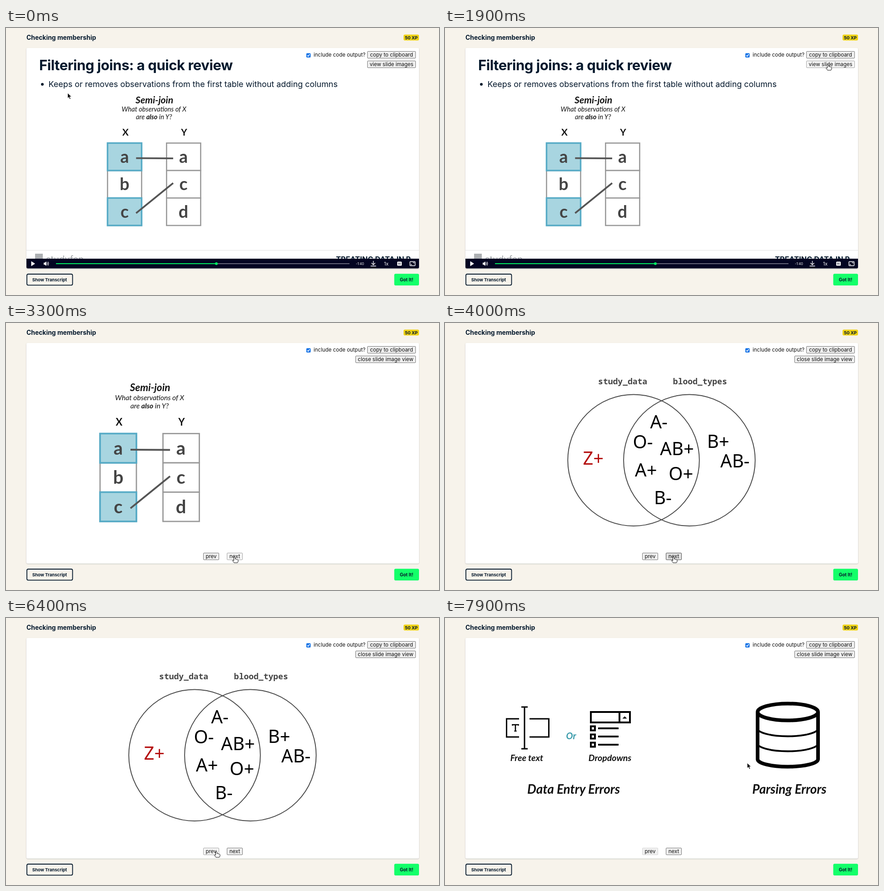
These frames come from a looping animation (953 px wide and 588 px high, 8000 ms). An HTML page:

```html
<!DOCTYPE html>
<html lang="en">
<head>
<meta charset="utf-8">
<title>Checking membership</title>
<style>
html, body { margin: 0; width: 100%; height: 100%; overflow: hidden; background: #f7f3eb; }
svg { display: block; width: 953px; height: 588px; font-family: Inter, "Open Sans", sans-serif; fill: #05192d; }
.b { font-weight: 700; }
.m { text-anchor: middle; }
.lato { font-family: Lato, sans-serif; fill: #111; text-anchor: middle; }
.i { font-style: italic; }
.line { fill: none; stroke: #000; }
.btn { font-size: 11.5px; text-anchor: middle; fill: #111; }
.btn rect { fill: #efefef; stroke: #767676; }
.btn.hover rect { fill: #dfdfdf; stroke: #4f4f4f; }
.btn.active rect { fill: #f5f5f5; stroke: #a5a5a5; }
.btn.off rect { fill: #f0f0f0; stroke: #d6d6d6; }
.venn { font: 41px "Noto Sans", sans-serif; text-anchor: middle; fill: #000; }
.venn .name { font: 700 18.5px "Noto Sans Mono", monospace; fill: #444; }
</style>
</head>
<body>
<svg viewBox="0 0 953 588">
  <defs>
    <filter id="shade" x="-5%" y="-5%" width="110%" height="110%">
      <feDropShadow dx="0" dy="1" stdDeviation="1.3" flood-color="#05192d" flood-opacity=".25"/>
    </filter>
  </defs>
  <text class="b" x="45" y="26" font-size="13.9">Checking membership</text>
  <rect x="875" y="14.500" width="34" height="13" rx="3" fill="#f0d316"/>
  <text class="b m" x="892" y="24.500" font-size="9.6">50 XP</text>
  <rect x="45" y="44" width="864" height="485.500" rx="3" fill="#fff" filter="url(#shade)"/>

  <g id="page">
    <text class="b" x="73" y="93" font-size="31" letter-spacing="-.45">Filtering joins: a quick review</text>
    <circle cx="80" cy="124" r="3"/>
    <text x="93.500" y="130" font-size="17.93">Keeps or removes observations from the first table without adding columns</text>
    <g id="small" transform="translate(29.3 25) scale(.938)"></g>
    <path d="M45 489.500H909" stroke="#e3e3e3"/>
    <rect x="64" y="497" width="17" height="17" fill="#adb0b3"/>
    <text x="88" y="516" font-size="20" fill="#a2a6aa">studyfen</text>
    <text class="b" x="891" y="515" font-size="16.3" text-anchor="end">TREATING DATA IN R</text>
    <path d="M45 508H909V526.500a3 3 0 0 1-3 3H48a3 3 0 0 1-3-3Z" fill="#030522"/>
    <path d="M110 519H756" stroke="#666779" stroke-width="2"/>
    <path d="M110 519H463" stroke="#03ef62" stroke-width="2"/>
    <circle cx="463" cy="519" r="3" fill="#03ef62"/>
    <g fill="#fff">
      <path d="M55.500 513.500L64 519L55.500 524.500Z"/>
      <path d="M83 516.800H85.500L88.800 514V524L85.500 521.200H83Z"/>
      <text class="m" x="779" y="522" font-size="7.4">-1:40</text>
      <text class="m" x="837" y="523" font-size="10.5">1x</text>
      <rect x="861" y="514.500" width="10" height="9" rx="1.500"/>
      <text class="b m" x="866" y="521" font-size="5.500" fill="#030522">cc</text>
    </g>
    <g fill="none" stroke="#fff" stroke-width="1.400">
      <path d="M90.300 516.500q2 2.500 0 5M92 514.600q3.500 4.400 0 8.800" stroke-width="1.100"/>
      <path d="M808.500 513V521M804.500 517.500L808.500 521.500L812.500 517.500M802.500 524.300H814.500"/>
      <rect x="889" y="514.500" width="11.500" height="9" rx="1"/>
      <path d="M891.500 519.500V521.500H893.500M895.500 516.500H898V518.500" stroke-width="1.200"/>
    </g>
  </g>

  <g id="errors">
    <g class="line" stroke-width="3">
      <path d="M168 196H182M175 196V288M168 288H182M163 222H135.500V262H163M186 222H228.500V262H186"/>
      <path d="M148.500 237V235H161.500V237M155 235V249M152.500 249H157.500" stroke-width="2.600"/>
      <g stroke-width="4"><rect x="321" y="207" width="86" height="23"/><path d="M384 207V230"/></g>
      <g id="rows" stroke-width="4"></g>
      <g stroke-width="8">
        <ellipse cx="754.500" cy="207" rx="66.500" ry="18.500"/>
        <path d="M688 207V311A66.500 16.500 0 0 0 821 311V207"/>
        <path d="M688 243A66.500 17.500 0 0 0 821 243M688 276A66.500 17.500 0 0 0 821 276" stroke-width="4"/>
      </g>
    </g>
    <path d="M390.500 221.500L395.500 216.500L400.500 221.500Z" fill="#000"/>
    <g class="lato b i">
      <text x="277.500" y="267" font-size="20" style="fill:#3a9bab">Or</text>
      <text x="180" y="315" font-size="19.500">Free text</text>
      <text x="363" y="315" font-size="19.500">Dropdowns</text>
      <text x="283" y="387" font-size="28">Data Entry Errors</text>
      <text x="758" y="387" font-size="28">Parsing Errors</text>
    </g>
  </g>
  <g id="semi"></g>
  <g id="anti" transform="translate(326 0)"></g>
  <g id="venn" class="venn"></g>

  <rect x="661" y="55.500" width="9.500" height="9.500" rx="1.800" fill="#1273e6"/>
  <path d="M663 60.300L665 62.300L668.700 57.700" fill="none" stroke="#fff" stroke-width="1.500"/>
  <text x="677" y="63" font-size="11.5" fill="#111">include code output?</text>
  <g id="buttons"></g>

  <rect x="46" y="542" width="100.500" height="24.300" rx="3" fill="none" stroke="#05192d" stroke-width="1.800"/>
  <text class="b m" x="96" y="557.700" font-size="9.6">Show Transcript</text>
  <rect x="854.500" y="541.200" width="54.500" height="25.800" rx="3" fill="#13ff69"/>
  <text class="b m" x="881.500" y="557.700" font-size="10">Got It!</text>

  <g id="cursor" stroke="#fff" stroke-linejoin="round">
    <path id="arrow" fill="#111" d="M0 0V12L2.800 9.500L4.700 14L7 13L5.100 8.700H9Z"/>
    <path id="hand" fill="#fff" stroke="#111" d="M-1.500 1.200Q0 -.8 1.500 1.200V5Q3 4 4 5.500Q5.500 4.800 6.200 6.200Q8 5.700 8 7.500V10L6.500 13H-1L-4.500 8.300Q-4.500 6.300 -1.500 8.200Z"/>
  </g>
</svg>
<script>
const $ = id => document.getElementById(id);
const text = (x, y, s, attrs = '') => `<text x="${x}" y="${y}" ${attrs}>${s}</text>`;

// Join diagram; picked lists the highlighted rows of table X
function join(name, word, picked) {
  const rows = [0, 1, 2];
  const cell = (x, r, on) => `<rect x="${x}" y="${243.5 + r * 64.5}" width="80" height="64.5"
    fill="${on ? '#a8d5e0' : '#fff'}" stroke="${on ? '#57abc6' : '#999'}" stroke-width="${on ? 3.7 : 2.8}"/>`;
  const letters = (x, s) => rows.map(r => text(x, 290 + r * 64.4, s[r])).join('');
  const plain = rows.map(r => cell(207, r, false) + cell(345.5, r, false)).join('');
  return `<g class="lato">
    ${text(317, 150, name, 'class="b i" font-size="22.5"')}
    <g class="i" font-size="15.6">${text(316, 170, 'What observations of X')}
    ${text(316, 188, `are <tspan class="b">${word}</tspan> in Y?`)}</g>
    <g class="b" font-size="22">${text(249, 226, 'X')}${text(386.5, 226, 'Y')}</g>
    ${plain}${picked.map(r => cell(207, r, true)).join('')}
    <g class="b" font-size="40" fill="#444">${letters(247, 'abc')}${letters(385, 'acd')}</g>
    <path d="M274 279L361 279.500M274 408L361 337.500" stroke="#555" stroke-width="4"/></g>`;
}
$('small').innerHTML = $('semi').innerHTML = join('Semi-join', 'also', [0, 2]);
$('anti').innerHTML = join('Anti-join', 'not', [1]);

$('rows').innerHTML = [243, 261, 279].map(y =>
  `<rect x="321" y="${y - 4.5}" width="9" height="9"/><path d="M337 ${y}H382"/>`).join('');

const circle = x => `<circle cx="${x}" cy="305.500" r="148.500" fill="none" stroke="#4a4a4a" stroke-width="2"/>`;
const shared = [['A-', 472, 233], ['O-', 436, 279], ['AB+', 513, 294],
  ['A+', 443, 342], ['O+', 522, 350], ['B-', 481, 405]];
$('venn').innerHTML = circle(415) + circle(541)
  + text(390.5, 134, 'study_data', 'class="name"') + text(565, 134, 'blood_types', 'class="name"')
  + text(324, 316, 'Z+', 'id="odd"') + text(606, 278, 'B+') + text(644, 322, 'AB-')
  + `<g id="shared">${shared.map(([s, x, y]) => text(x, y, s)).join('')}</g>`;

const button = (id, label, x, y, w) => `<g id="${id}" class="btn">
  <rect x="${x + .5}" y="${y + .5}" width="${w - 1}" height="15" rx="1.500"/>
  ${text(x + w / 2, y + 11.5, label)}</g>`;
$('buttons').innerHTML = button('copy', 'copy to clipboard', 795, 51, 107)
  + button('view', 'view slide images', 795, 72, 107)
  + button('close', 'close slide image view', 769, 72, 133)
  + button('prev', 'prev', 434, 506, 35) + button('next', 'next', 486, 506, 35);

const PAGE = -1, ERRORS = 0, SEMI = 1, ANTI = 2, ODD = 3, SHARED = 4;
const scenes = [[0, PAGE], [2000, SEMI], [3400, ANTI], [4000, ODD], [4800, SHARED],
  [6100, ODD], [6500, ANTI], [6700, SEMI], [7000, ERRORS]];
// start, number of 100 ms steps, end point
const moves = [[100, 4, 214, 163], [600, 4, 617, 291], [1100, 4, 833, 96], [1600, 2, 843, 80],
  [2300, 5, 530, 390], [2900, 3, 503, 515], [5700, 3, 463, 514], [7800, 2, 665, 319]];
const hovers = { view: [1600, 2000], close: [2000, 2300], next: [3100, 4800], prev: [5900, 7000] };
const presses = { view: [1900], close: [], next: [3300, 3900, 4700], prev: [6000, 6400, 6600, 6900] };
const hands = [[1600, 2300], [3100, 4900], [5900, 7100]];
const within = (t, [from, to]) => t >= from && t < to;
const show = (id, on) => $(id).style.display = on ? '' : 'none';

function pointer(t) {
  let x = 135.5, y = 143;
  for (const [start, steps, toX, toY] of moves) {
    if (t < start) break;
    const p = Math.min(1, ((t - start) / 100 + 1) / steps), e = p * p * (3 - 2 * p);
    x += (toX - x) * e;
    y += (toY - y) * e;
  }
  return [x, y];
}

function draw(now) {
  const t = Math.floor(now % 8000 / 100) * 100;
  const scene = scenes.filter(s => s[0] <= t).pop()[1];
  const slides = scene !== PAGE;
  show('page', !slides);
  show('errors', scene === ERRORS);
  show('semi', scene === SEMI || scene === ANTI);
  show('anti', scene === ANTI);
  show('venn', scene >= ODD);
  $('venn').setAttribute('transform', scene === ODD ? 'translate(10.4 4.4) scale(.975)' : '');
  $('odd').style.fill = scene === ODD ? '#b40d0d' : '';
  $('shared').style.fill = scene === SHARED ? '#1fa4d1' : '';

  show('view', !slides);
  for (const id of ['close', 'prev', 'next']) show(id, slides);
  for (const id in hovers) {
    const off = id === 'prev' && scene === ERRORS || id === 'next' && scene === SHARED;
    const state = off ? 'off' : presses[id].includes(t) ? 'active' : within(t, hovers[id]) ? 'hover' : '';
    $(id).setAttribute('class', 'btn ' + state);
  }

  const hand = hands.some(h => within(t, h));
  show('hand', hand);
  show('arrow', !hand);
  $('cursor').setAttribute('transform', `translate(${pointer(t)})`);
}

const began = performance.now();
function tick() {
  draw(performance.now() - began);
  requestAnimationFrame(tick);
}
tick();
</script>
</body>
</html>
```
